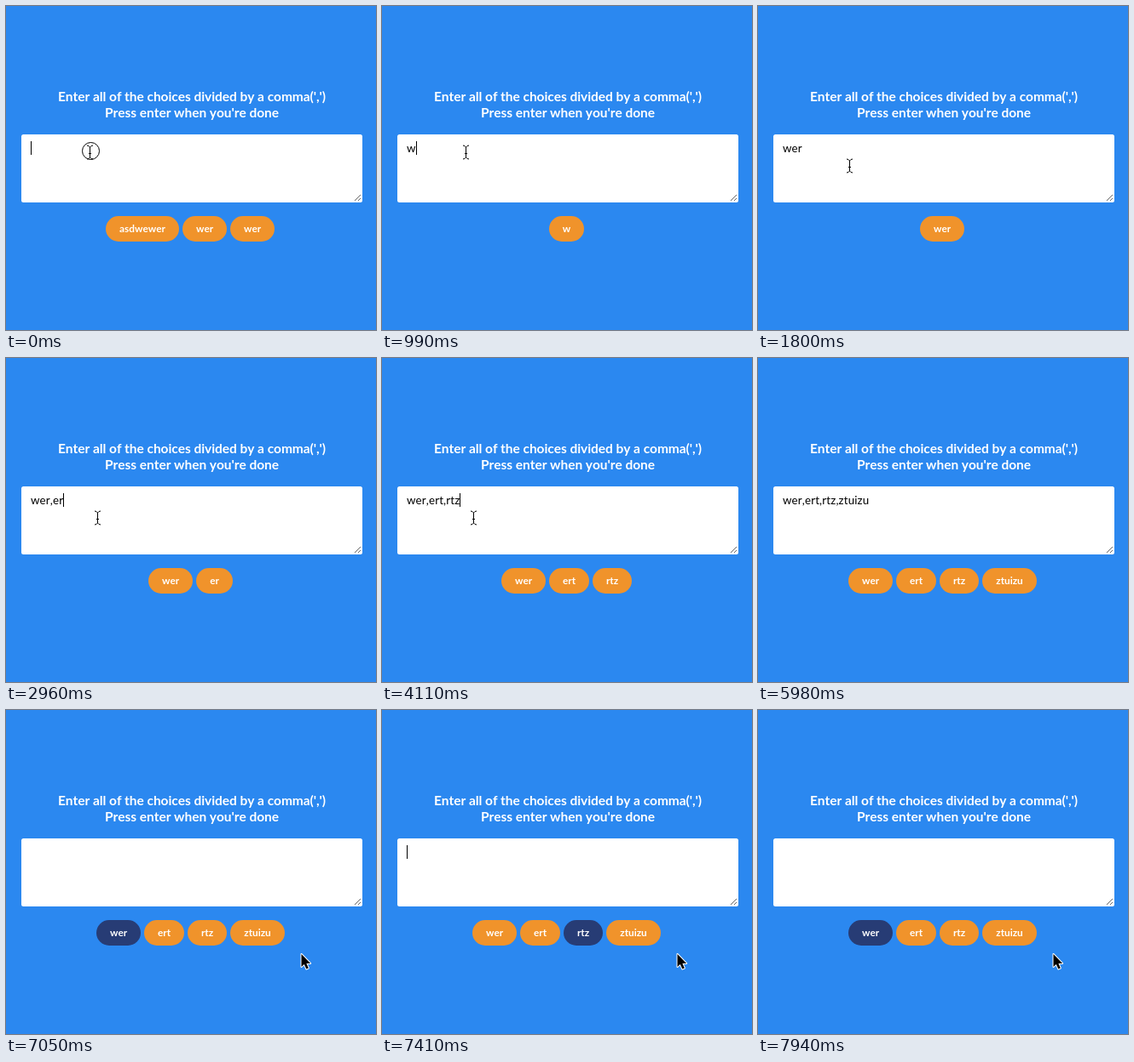
An HTML page with a canvas that plays this animation: 434x381 px, repeating every 8 s.

```html
<!DOCTYPE html>
<html lang="en">
<head>
<meta charset="utf-8">
<title>Random choice picker</title>
<style>
  html, body { margin: 0; width: 100%; height: 100%; overflow: hidden; background: #2b88f0; }
  canvas { display: block; }
</style>
</head>
<body>
<canvas id="stage" width="434" height="381"></canvas>
<script>
const ctx = document.getElementById('stage').getContext('2d');
const LOOP = 8000;
const FONT = 'Lato, "Open Sans", sans-serif';
ctx.fontKerning = 'none';

// Each track lists [start time, value]; a value holds until the next entry.
const typed = [
  [0, ''], [810, 'w'], [1080, 'we'], [1260, 'wer'], [2330, 'wer,'],
  [2780, 'wer,e'], [2960, 'wer,er'], [3040, 'wer,ert'], [3580, 'wer,ert,'],
  [3930, 'wer,ert,r'], [4020, 'wer,ert,rt'], [4110, 'wer,ert,rtz'],
  [4640, 'wer,ert,rtz,'], [5000, 'wer,ert,rtz,zt'], [5090, 'wer,ert,rtz,ztui'],
  [5180, 'wer,ert,rtz,ztuiz'], [5260, 'wer,ert,rtz,ztuizu'], [6250, '']
];
// Choices follow the typed text, sometimes a moment later.
const choices = [
  [0, 'asdwewer,wer,wer'], [990, 'w'],
  ...typed.filter(([time, text]) => time > 990 && text)
    .map(([time, text]) => [time === 2780 ? 2870 : time, text])
];
const caretShown = [
  [0, true], [180, false], [720, true], [1800, false], [2250, true],
  [4560, false], [4640, true], [5800, false], [6250, true], [6780, false],
  [7230, true], [7670, false]
];
const picked = [
  [0, -1], [6430, 3], [6520, 2], [6600, 1], [6690, 2], [6780, 3],
  [7050, 0], [7140, 1], [7230, 3], [7320, 0], [7410, 2], [7500, 3],
  [7590, 1], [7670, 0], [7850, 1], [7940, 0]
];
const pointer = [
  [0, ['ring', 98.5, 172]], [90, ['beam', 98.5, 172]],
  [1620, ['beam', 101.5, 177]], [1710, ['beam', 106.5, 186]], [1800, ['beam', 107.5, 188]],
  [5710, ['arrow', 298, 335]], [5980, ['none', 0, 0]],
  [6430, ['arrow', 402, 362]], [6520, ['arrow', 384, 334]], [6600, ['arrow', 363, 304]],
  [6690, ['arrow', 350, 291]], [6780, ['arrow', 346.5, 287]]
];

const at = (track, time) => track.findLast(([start]) => start <= time)[1];

function setFont(font, spacing = 0) {
  ctx.font = `${font} ${FONT}`;
  ctx.letterSpacing = `${spacing}px`;
}

function label(text, x, y, color, align = 'left') {
  ctx.fillStyle = color;
  ctx.textAlign = align;
  ctx.fillText(text, x, y);
}

function roundBox(x, y, w, h, radius, color) {
  ctx.fillStyle = color;
  ctx.beginPath();
  ctx.roundRect(x, y, w, h, radius);
  ctx.fill();
}

function line(points, color) {
  ctx.strokeStyle = color;
  ctx.lineWidth = 1;
  ctx.beginPath();
  points.forEach(([x, y]) => ctx.lineTo(x, y));
  ctx.stroke();
}

function drawHeading() {
  setFont('bold 15.5px', -0.05);
  label("Enter all of the choices divided by a comma(',')", 218, 112, '#fff', 'center');
  label("Press enter when you're done", 218, 131, '#fff', 'center');
}

function drawField(time) {
  roundBox(18, 151, 400, 80, 2.5, '#fff');
  line([[409, 229], [416, 222]], '#666');
  line([[413, 229], [416, 226]], '#666');

  const text = at(typed, time);
  setFont('13.333px', 0.15);
  label(text, 29, 172, '#000');
  // The old caret stays at the end of the text until its next blink.
  const caretText = time >= 6250 && time < 6780 ? 'wer,ert,rtz,ztuizu' : text;
  const caretX = 29 + Math.round(ctx.measureText(caretText).width);
  if (at(caretShown, time)) {
    ctx.fillStyle = '#000';
    ctx.fillRect(caretX, 159, 1, 16);
  }
}

function drawChips(time) {
  const words = at(choices, time).split(',').filter(Boolean);
  const active = at(picked, time);
  setFont('bold 11.8px');
  const widths = words.map(word => Math.round(ctx.measureText(word).width) + 32);
  const total = widths.reduce((sum, w) => sum + w + 4, -4);
  let x = Math.round(216 - total / 2);
  words.forEach((word, i) => {
    roundBox(x, 247, widths[i], 30, 15, i === active ? '#273c75' : '#f0932b');
    label(word, x + widths[i] / 2, 266, '#fff', 'center');
    x += widths[i] + 4;
  });
}

function drawBeam() {
  for (const side of [-1, 1]) {
    line([[-3.5, side * 8], [-1.5, side * 7.5], [0, side * 6], [1.5, side * 7.5], [3.5, side * 8]], '#000');
  }
  line([[0, -6], [0, 6]], '#000');
  line([[-1.5, 1.5], [1.5, 1.5]], '#000');
}

function drawRing() {
  ctx.beginPath();
  ctx.arc(1, -1.5, 10, 0, Math.PI * 2);
  ctx.lineWidth = 1;
  ctx.strokeStyle = '#000';
  ctx.stroke();
}

function drawArrow() {
  ctx.beginPath();
  [[0, 0], [0, 15], [3.3, 11.9], [5.8, 17.6], [8.3, 16.5], [5.9, 11], [10.6, 11]]
    .forEach(([x, y]) => ctx.lineTo(x, y));
  ctx.closePath();
  ctx.lineJoin = 'round';
  ctx.lineWidth = 2;
  ctx.strokeStyle = '#fff';
  ctx.stroke();
  ctx.fillStyle = '#000';
  ctx.fill();
}

function drawPointer(time) {
  const [kind, x, y] = at(pointer, time);
  ctx.save();
  ctx.translate(x, y);
  if (kind === 'ring') drawRing();
  if (kind === 'ring' || kind === 'beam') drawBeam();
  if (kind === 'arrow') drawArrow();
  ctx.restore();
}

function draw() {
  const time = performance.now() % LOOP;
  ctx.fillStyle = '#2b88f0';
  ctx.fillRect(0, 0, 434, 381);
  drawHeading();
  drawField(time);
  drawChips(time);
  drawPointer(time);
  requestAnimationFrame(draw);
}
requestAnimationFrame(draw);
</script>
</body>
</html>
```
